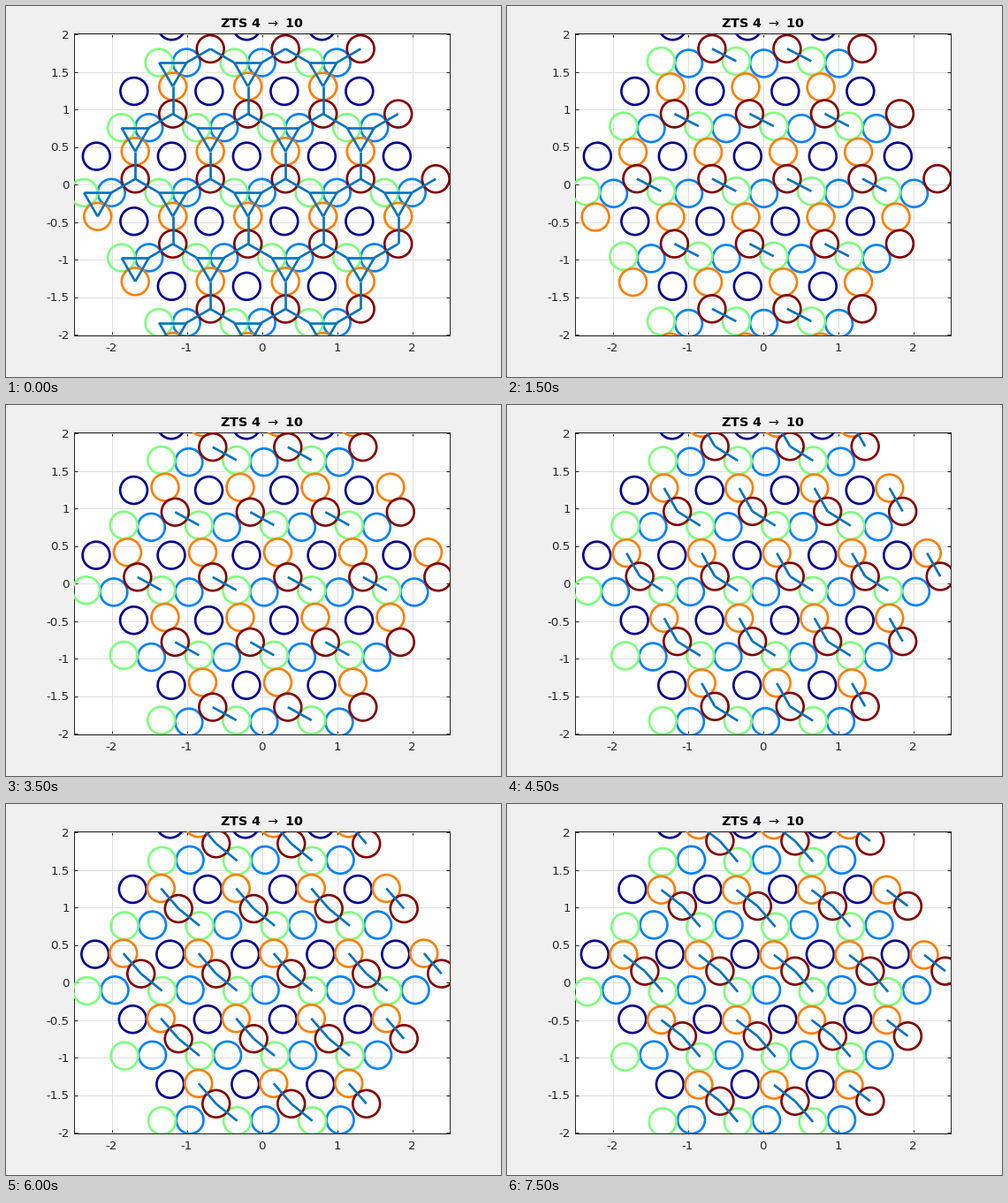
A matplotlib script that plays this animation: 560 px wide and 420 px high, repeating every 8000 ms.

```python
import numpy as np
import matplotlib.pyplot as plt
from matplotlib.animation import FuncAnimation
from matplotlib.collections import LineCollection

W, H, DPI = 560, 420, 100
PX = 72 / DPI                       # one pixel in points
UNIT = 85                           # pixels per data unit
STEPS, INTERVAL = 16, 500
WRAP, CONTACT = 5, 9                # steps of the orange wrap and its new bond
DARK = (0.15, 0.15, 0.15)

plt.rcParams["font.family"] = "DejaVu Sans"
plt.rcParams["axes.unicode_minus"] = False

E1 = np.array([1, 0])
E2 = np.array([0.5, np.sqrt(3) / 2])
CELLS = [(i, j) for j in range(-2, 3) for i in range(-2, 3) if abs(i + j) <= 2]
LATTICE = np.array([i * E1 + j * E2 for i, j in CELLS])

COLORS = {
    "navy": (0, 0, 0.5625), "blue": (0, 0.5, 1), "green": (0.5, 1, 0.5),
    "orange": (1, 0.5, 0), "red": (0.5, 0, 0),
}

# At rest: a triangle of touching discs on one honeycomb site, red on the other
BOND = (np.sqrt(3) - 1) / 2
CENTER = np.array([-0.186, -0.215])


def polar(r, deg):
    return r * np.array([np.cos(np.radians(deg)), np.sin(np.radians(deg))])


START = {
    "navy": polar(1 / np.sqrt(3), 90) + (-0.016, 0.013),
    "blue": polar(BOND / np.sqrt(3), 30),
    "green": polar(BOND / np.sqrt(3), 150),
    "orange": polar(BOND / np.sqrt(3), 270),
    "red": polar(1 / np.sqrt(3), 30),
}

# Drift: Bezier control points in pixels from the start, y down
DRIFT = {
    "navy": [(0, 0), (0, 0), (-3, 0)],
    "blue": [(2.3, 2.8), (3.7, -1.3), (4.3, -0.8)],
    "green": [(2, -4.1), (4.4, -0.3), (3, 1.4)],
    "orange": [(-5.5, 1.1), (-14.6, 3.1), (-14.2, 6.2)],
    "red": [(0.7, -0.1), (3.9, -0.6), (9.7, -6.6)],
}


def place(kind, step):
    u = step / (STEPS - 1)
    weights = [3 * u * (1 - u) ** 2, 3 * u ** 2 * (1 - u), u ** 3]
    drift = weights @ np.array(DRIFT[kind]) * (1, -1) / UNIT
    wrap = E2 if kind == "orange" and step >= WRAP else 0
    return CENTER + START[kind] + drift + wrap + LATTICE


def bonds(step):
    """Bonded pairs: kind, kind, cell offset of the second disc."""
    pairs = [("green", "red", (-1, 0))]
    if step == 0:
        pairs += [("green", "blue", (0, 0)), ("blue", "orange", (0, 0)),
                  ("orange", "green", (0, 0)), ("blue", "red", (0, 0)),
                  ("orange", "red", (0, -1))]
    elif step >= CONTACT:
        pairs.append(("orange", "red", (0, 0)))
    return pairs


fig = plt.figure(figsize=(W / DPI, H / DPI), dpi=DPI, facecolor="#f0f0f0")
ax = fig.add_axes([77 / W, 47 / H, 425 / W, 342 / H])
ax.set_xlim(-2.5, 2.5)
ax.set_ylim(-171 / UNIT, 171 / UNIT)
ax.set_xticks(range(-2, 3))
yticks = np.arange(-2, 2.5, 0.5)
ax.set_yticks(yticks, [f"{v:g}" for v in yticks])
ax.set_axisbelow(True)
ax.grid(color="#dfdfdf", linewidth=PX)
ax.tick_params(direction="in", top=True, right=True, length=4.2 * PX,
               width=PX, color=DARK, labelcolor=DARK,
               labelsize=13.33 * PX, pad=5.2 * PX)
ax.tick_params(axis="x", pad=8 * PX)
for spine in ax.spines.values():
    spine.set(color=DARK, linewidth=PX)
fig.text(289.7 / W, 1 - 24 / H, r"ZTS 4 $\rightarrow$ 10", ha="center",
         va="baseline", weight="bold", size=14.4 * PX)

discs = {k: ax.scatter([], [], s=(30.8 * PX) ** 2, facecolors="none",
                       edgecolors=[c], linewidths=2.67 * PX, zorder=3)
         for k, c in COLORS.items()}
links = LineCollection([], colors=[(0, 0.447, 0.741)],
                       linewidths=2.67 * PX, zorder=4)
ax.add_collection(links, autolim=False)


def draw(step):
    pos = {k: place(k, step) for k in discs}
    for k, disc in discs.items():
        disc.set_offsets(pos[k])
    segments = []
    for a, b, (di, dj) in bonds(step):
        for n, (i, j) in enumerate(CELLS):
            cell = (i + di, j + dj)
            if cell in CELLS:
                segments.append([pos[a][n], pos[b][CELLS.index(cell)]])
    links.set_segments(segments)
    return [*discs.values(), links]


anim = FuncAnimation(fig, draw, frames=STEPS, interval=INTERVAL,
                     init_func=lambda: draw(0), repeat=True, repeat_delay=0)
plt.show()
```
